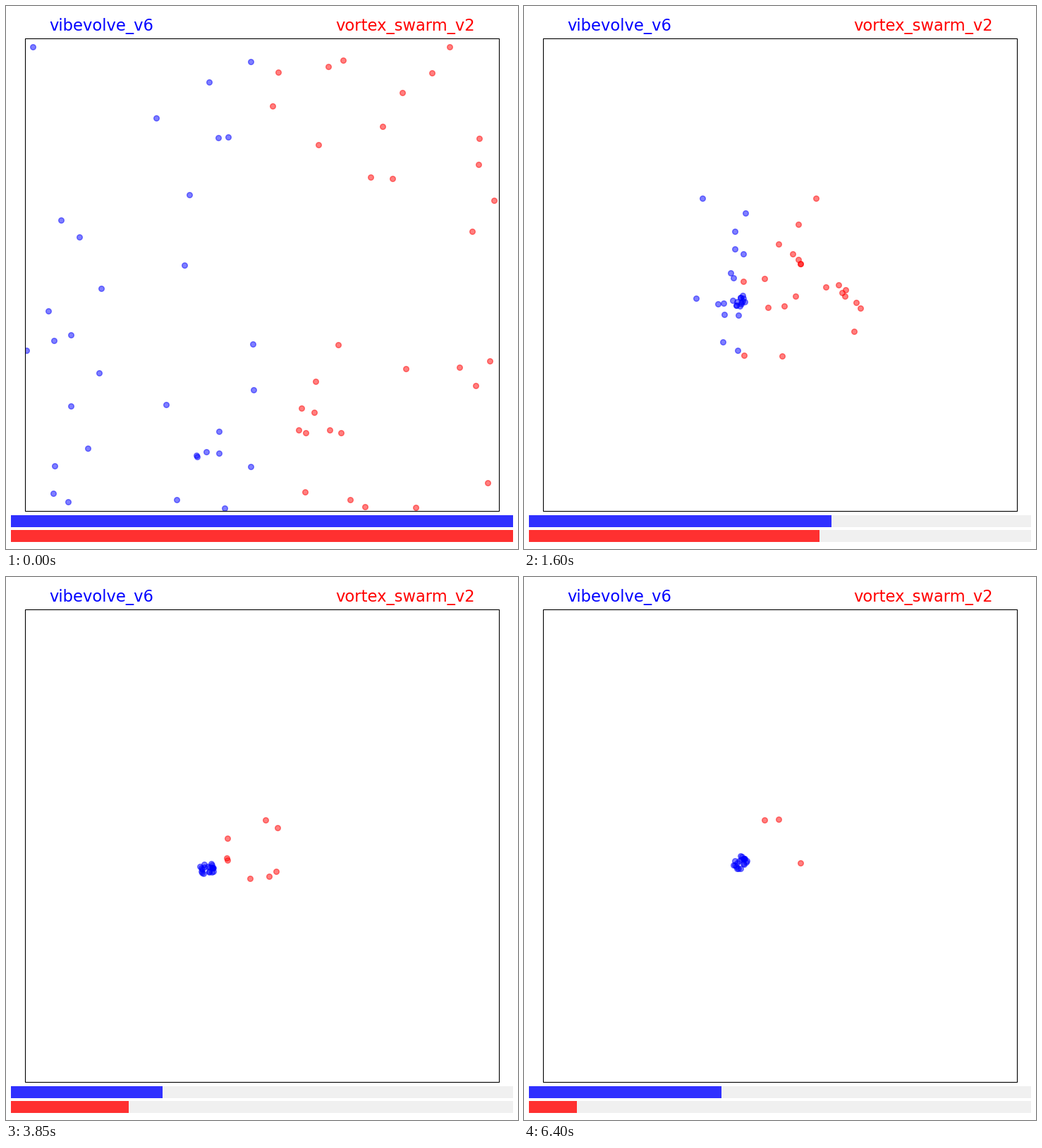
Animation, 726 px wide and 771 px high, one loop 6.45 s. Source, as a matplotlib script:

```python
import numpy as np
import matplotlib.pyplot as plt
from matplotlib.animation import FuncAnimation
from matplotlib.patches import Rectangle

W, H, DPI = 726, 771, 100
STEPS, STEP_MS = 129, 50
SPEED = 6.72             # most a dot moves per step along each axis
SPIN = -0.1356           # radians per step around a swarm's centre
SCOUT_END = 14           # blue scouts in two packs up to this step
EYE, RING = (354, 386), 43
rng = np.random.default_rng(6)

# Starting layout, the toughest dots first.
RED_START = [
    (686, 504), (604, 95), (562, 123), (509, 711), (692, 276), (581, 712),
    (683, 677), (670, 225), (671, 188), (661, 320), (629, 58), (548, 245),
    (666, 539), (643, 513), (567, 515), (534, 171), (443, 197), (517, 243),
    (471, 481), (475, 606), (415, 602), (425, 606), (478, 77), (457, 86),
    (378, 142), (439, 533), (437, 577), (459, 602), (488, 701),
    (386, 94), (419, 571), (424, 690)]
BLUE_START = [
    (351, 545), (315, 186), (38, 58), (213, 159), (347, 79), (288, 108),
    (78, 304), (104, 328), (60, 433), (29, 489), (68, 475), (92, 467),
    (92, 568), (132, 521), (116, 628), (227, 566), (69, 653), (67, 692),
    (88, 704), (347, 654), (135, 401), (253, 368), (270, 638), (271, 640),
    (284, 633), (302, 635), (302, 604), (301, 187), (260, 268), (242, 701),
    (310, 713), (350, 480)]

# Team strength at key steps: dots alive and right edge of the health bar.
KEYS = (0, 14, 32, 47, 62, 92, 128)
RED_ALIVE, RED_BAR = (32, 29, 22, 13, 11, 5, 3), (719, 604, 419, 266, 236, 111.5, 74.5)
BLUE_ALIVE, BLUE_BAR = (32, 31, 27, 21, 21, 21, 21), (719, 608, 435.5, 232, 262, 182, 279.5)

# Ring places of the lasting red dots at the end, in degrees; the rest are random.
red_angle = rng.uniform(0, 2 * np.pi, len(RED_START))
lasting = np.radians([28, 280, 253, 164, 65, 126, 122, 12, 2, -12, -20])
red_angle[:len(lasting)] = lasting

blue_angle = rng.uniform(0, 2 * np.pi, len(BLUE_START))
blue_radius = 10 * np.sqrt(rng.uniform(0, 1, len(BLUE_START)))
pack_y = np.where(np.array(BLUE_START)[:, 1] < 350, 245, 488)


def circle(centre, radius, angle, t):
    """Places on a circle turning about its centre."""
    a = angle + SPIN * (t - STEPS + 1)
    return np.column_stack([centre[0] + radius * np.cos(a),
                            centre[1] + radius * np.sin(a)])


def red_pull(pos, t):
    return circle(EYE, RING, red_angle, t) - pos


def blue_pull(pos, t):
    if t <= SCOUT_END:
        return 0.1 * (np.column_stack([np.full(len(pos), 400), pack_y]) - pos)
    knots = (32, 47, 62, 92, 128)
    centre = (np.interp(t, knots, (304, 317, 277, 293, 306)),
              np.interp(t, knots, (417, 401, 416, 411, 405)))
    return circle(centre, blue_radius, blue_angle, t) - pos


def simulate(start, pull):
    pos = np.array(start, float)
    trail = [pos]
    for t in range(1, STEPS):
        pos = pos + np.clip(pull(pos, t), -SPEED, SPEED)
        trail.append(pos)
    return trail


red, blue = simulate(RED_START, red_pull), simulate(BLUE_START, blue_pull)

fig = plt.figure(figsize=(W / DPI, H / DPI), dpi=DPI, facecolor="white")
ax = fig.add_axes([0, 0, 1, 1])
ax.set(xlim=(0, W), ylim=(H, 0))
ax.axis("off")

arena = Rectangle((27, 46), 672, 671, fill=False, ec="black", lw=0.8, zorder=5)
ax.add_patch(arena)

BAR_X, BAR_W, BAR_H = 7, 712, 17


def make_bar(y, color):
    ax.add_patch(Rectangle((BAR_X, y), BAR_W, BAR_H, fc="#f0f0f0", lw=0))
    return ax.add_patch(Rectangle((BAR_X, y), BAR_W, BAR_H, fc=color, lw=0, zorder=2))


def make_dots(color, z):
    line, = ax.plot([], [], "o", color=color, alpha=0.5, ms=5.48, mew=1, zorder=z)
    line.set_clip_path(arena)
    return line


def make_title(x, text, color):
    ax.text(x, 35, text, color=color, size=16.25, family="DejaVu Sans",
            ha="center", va="baseline")


blue_bar, red_bar = make_bar(723, "#3030ff"), make_bar(744, "#ff3030")
blue_dots, red_dots = make_dots("blue", 3), make_dots("red", 4)
make_title(135.2, "vibevolve_v6", "blue")
make_title(566.5, "vortex_swarm_v2", "red")


def show_team(t, trail, dots, alive, bar, edge):
    n = int(np.ceil(np.interp(t, KEYS, alive)))
    dots.set_data(*trail[t][:n].T)
    bar.set_width(np.interp(t, KEYS, edge) - BAR_X)


def draw(t):
    show_team(t, blue, blue_dots, BLUE_ALIVE, blue_bar, BLUE_BAR)
    show_team(t, red, red_dots, RED_ALIVE, red_bar, RED_BAR)
    return blue_dots, red_dots, blue_bar, red_bar


anim = FuncAnimation(fig, draw, frames=STEPS, interval=STEP_MS,
                     init_func=lambda: draw(0), repeat=True, repeat_delay=0)
plt.show()
```
